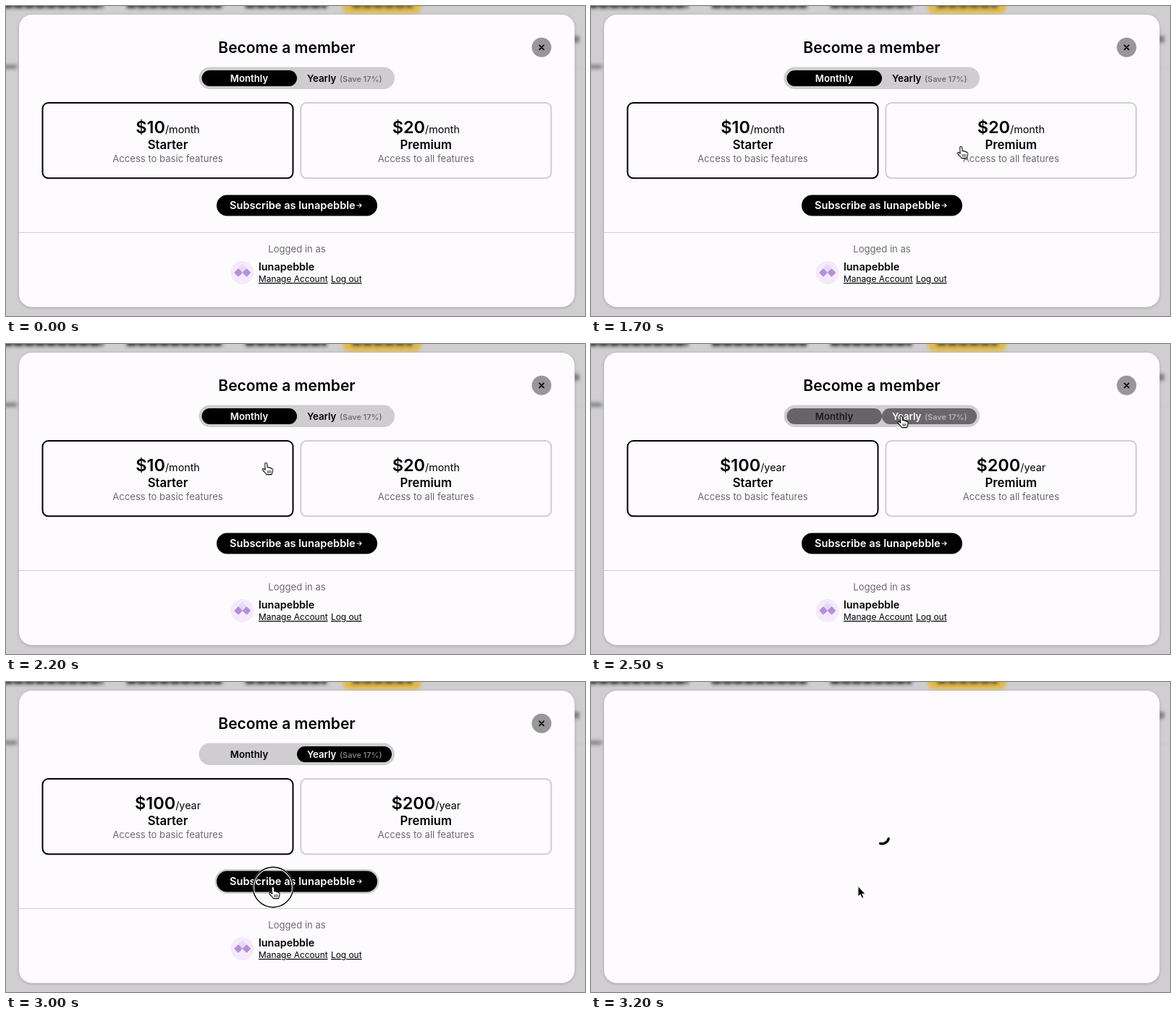
These frames come from a looping animation (800x429 px, 3300 ms). An HTML page:

```html
<!DOCTYPE html>
<html lang="en">
<head>
<meta charset="utf-8">
<title>Become a member</title>
<style>
  html, body { margin: 0; width: 100%; height: 100%; overflow: hidden; background: #d0ced1; }
  svg { display: block; width: 800px; height: 429px; font-family: Inter, sans-serif; }
  .bold { font-weight: 600; }
  .mid { text-anchor: middle; }
  .soft { fill: #6b696c; }
  .price { font-size: 23.5px; font-weight: 600; }
  .price tspan { font-size: 14.3px; font-weight: 400; }
  .plan { font-size: 16.7px; font-weight: 600; }
  .small { font-size: 13.1px; }
  .link { font-size: 11.9px; text-decoration: underline; text-underline-offset: 2px; }
  .card { fill: none; stroke-width: 2; }

  /* One 3.3 s loop, held in steps of 100 ms */
  .anim { animation: 3300ms step-end infinite; }
  #starter { stroke: #000; animation-name: starter; }
  #premium { stroke: #cfcdd0; animation-name: premium; }
  #monthPill { animation-name: monthPill; }
  #yearPill { animation-name: yearPill; }
  #monthText { animation-name: monthText; }
  #yearText { animation-name: yearText; }
  #saving { animation-name: saving; }
  .perMonth { animation-name: untilYearly; }
  .perYear { animation-name: fromYearly; }
  #focus { animation-name: focus; }
  #content { animation-name: content; }
  #loading { animation-name: loading; }
  #spinner { animation-name: spin; }
  #pointer { animation-name: move; }
  #hand { animation-name: hand; }
  #arrow { animation-name: loading; }
  #ring { animation-name: click; }

  @keyframes starter {
    0%, 66.66%, 100% { stroke: #000; }
    57.57% { stroke: #cfcdd0; }
  }
  @keyframes premium {
    0%, 66.66%, 100% { stroke: #cfcdd0; }
    57.57% { stroke: #000; }
  }
  @keyframes monthPill {
    0% { fill: #000; }
    75.75% { fill: #666467; }
    78.78%, 100% { fill: #cfcdd0; }
  }
  @keyframes yearPill {
    0% { fill: #cfcdd0; }
    75.75% { fill: #69676a; }
    78.78%, 100% { fill: #000; }
  }
  @keyframes monthText {
    0% { fill: #fff; }
    75.75% { fill: #1d1c1e; }
    78.78%, 100% { fill: #000; }
  }
  @keyframes yearText {
    0% { fill: #000; }
    75.75%, 100% { fill: #fff; }
  }
  @keyframes saving {
    0% { fill: #717073; }
    75.75% { fill: #b4b2b5; }
    78.78%, 100% { fill: #807e81; }
  }
  @keyframes untilYearly {
    0% { opacity: 1; }
    75.75%, 100% { opacity: 0; }
  }
  @keyframes fromYearly {
    0% { opacity: 0; }
    75.75%, 100% { opacity: 1; }
  }
  @keyframes focus {
    0% { opacity: 0; }
    87.87%, 100% { opacity: 1; }
  }
  @keyframes content {
    0% { opacity: 1; }
    93.93%, 100% { opacity: 0; }
  }
  @keyframes loading {
    0% { opacity: 0; }
    93.93%, 100% { opacity: 1; }
  }
  @keyframes spin {
    0% { transform: rotate(-90deg); }
    96.96%, 100% { transform: rotate(0deg); }
  }
  @keyframes hand {
    0% { opacity: 0; }
    51.51% { opacity: 1; }
    93.93%, 100% { opacity: 0; }
  }
  @keyframes click {
    0%, 57.57%, 66.66%, 75.75%, 93.93%, 100% { opacity: 0; }
    54.54%, 63.63%, 72.72%, 84.84% { opacity: 1; }
  }
  @keyframes move {
    0%, 51.51% { transform: translate(511.5px, 195px); }
    54.54%, 57.57% { transform: translate(530px, 183px); }
    60.6% { transform: translate(442px, 172px); }
    63.63%, 66.66% { transform: translate(359.5px, 165px); }
    69.69% { transform: translate(402px, 126px); }
    72.72%, 75.75% { transform: translate(429px, 100px); }
    78.78% { transform: translate(422px, 125px); }
    81.81% { transform: translate(388px, 222px); }
    84.84%, 100% { transform: translate(369px, 284px); }
  }
</style>
</head>
<body>
<svg viewBox="0 0 800 429">
  <defs>
    <filter id="blur" x="-10" y="-20" width="820" height="140" filterUnits="userSpaceOnUse">
      <feGaussianBlur stdDeviation="2.4"/>
    </filter>
    <filter id="shadow" x="0" y="0" width="800" height="429" filterUnits="userSpaceOnUse">
      <feDropShadow dx="0" dy="1" stdDeviation="2" flood-opacity=".22"/>
    </filter>
  </defs>

  <rect width="800" height="429" fill="#d0ced1"/>
  <g filter="url(#blur)">
    <path d="M-10 85H810" stroke="#c3c1c4"/>
    <rect x="465" y="-18" width="109" height="28" rx="9" fill="#e2b94a"/>
    <path d="M-4 -2H134M167 -2H298M331 -2H443M478 -2H562" stroke="#222124" stroke-width="9" stroke-dasharray="13 2"/>
    <path d="M-4 84H15" stroke="#777578" stroke-width="5"/>
    <path d="M784 46H792" stroke="#777578" stroke-width="9"/>
  </g>
  <rect x="18" y="12" width="767.5" height="404.5" rx="18" fill="#fdfbfe" filter="url(#shadow)"/>

  <g id="content" class="anim">
    <text class="mid bold" x="388" y="65" font-size="21">Become a member</text>
    <circle cx="740" cy="57.3" r="13.5" fill="#989699"/>
    <path d="M737 54.3l6 6m0-6l-6 6" stroke="#000" stroke-width="1.8" stroke-linecap="round"/>

    <rect x="266.5" y="84.5" width="270.5" height="30.5" rx="15.25" fill="#cfcdd0"/>
    <rect id="monthPill" class="anim" x="270.5" y="89" width="131.5" height="22" rx="11"/>
    <rect id="yearPill" class="anim" x="402" y="89" width="131" height="22" rx="11"/>
    <g class="bold">
      <text id="monthText" class="anim mid" x="336" y="105" font-size="13.2">Monthly</text>
      <text id="yearText" class="anim" x="416" y="105" font-size="13.2">Yearly</text>
      <text id="saving" class="anim" x="461" y="104.5" font-size="10.9">(Save 17%)</text>
    </g>

    <rect id="starter" class="anim card" x="50.5" y="134" width="346" height="104.3" rx="8"/>
    <rect id="premium" class="anim card" x="407.3" y="134" width="346" height="104.3" rx="8"/>
    <g class="mid">
      <g class="price">
        <text class="anim perMonth" x="223.5" y="176">$10<tspan>/month</tspan></text>
        <text class="anim perMonth" x="580.3" y="176">$20<tspan>/month</tspan></text>
        <text class="anim perYear" x="223.5" y="176">$100<tspan>/year</tspan></text>
        <text class="anim perYear" x="580.3" y="176">$200<tspan>/year</tspan></text>
      </g>
      <text class="plan" x="223.5" y="198">Starter</text>
      <text class="plan" x="580.3" y="198">Premium</text>
      <text class="small soft" x="223.5" y="215.7">Access to basic features</text>
      <text class="small soft" x="580.3" y="215.7">Access to all features</text>
    </g>

    <rect id="focus" class="anim" x="288.5" y="259" width="227" height="34" rx="17" fill="#cfcdd0"/>
    <rect x="291" y="261.5" width="222" height="29" rx="14.5"/>
    <text class="bold" x="309" y="281" font-size="14.6" fill="#fff">Subscribe as lunapebble</text>
    <path d="M484.5 276H491m-2.6-2.6l2.6 2.6l-2.6 2.6" fill="none" stroke="#fff" stroke-width="1.2"/>

    <path d="M18 313.5H785.5" stroke="#cfcdd0"/>
    <text class="mid small soft" x="402" y="340.7">Logged in as</text>
    <circle cx="326.5" cy="369" r="16" fill="#f4eafb"/>
    <g stroke-linejoin="round" stroke-width="2">
      <path d="M326.5 358.5l4.8 4.8l-4.8 4.8l-4.8-4.8z" fill="#ead8f7" stroke="#ead8f7"/>
      <path d="M321 364.5l4.5 4.5l-4.5 4.5l-4.5-4.5zM332.5 364.5l4.5 4.5l-4.5 4.5l-4.5-4.5z" fill="#b590d8" stroke="#b590d8"/>
    </g>
    <text class="bold" x="349" y="366" font-size="14.4">lunapebble</text>
    <text class="link" x="349" y="382">Manage Account</text>
    <text class="link" x="449" y="382">Log out</text>
  </g>

  <g id="loading" class="anim">
    <g transform="translate(402 214.3)">
      <path id="spinner" class="anim" d="M9.2 2.5A9.5 9.5 0 0 1 -2.5 9.2" fill="none" stroke="#000" stroke-width="3.4" stroke-linecap="round"/>
    </g>
  </g>

  <g id="pointer" class="anim">
    <g id="ring" class="anim" fill="none">
      <circle r="27.2" stroke="#fff" stroke-width="2.6"/>
      <circle r="27.7" stroke="#000" stroke-width="1.4"/>
    </g>
    <g id="hand" class="anim" stroke="#000" stroke-linecap="round" stroke-linejoin="round">
      <path d="M-2 1.2C-2 -1 1.2 -1 1.3 1L1.8 6Q3.8 4.8 4.4 6.4Q6.2 5.6 6.8 7.2Q9 6.8 9 9.5C9 12.5 8 13.5 7.6 15.6L.4 15.6C-.5 13.5 -3 12 -4.8 9.4C-5.8 7.8 -4 6.7 -2.6 8.1L-1.2 9.2Z" fill="#fff" stroke-width="1.1"/>
      <path d="M1.9 10.5l.2 3M3.9 10.4l.1 3M5.9 10.4v3" stroke-width=".8"/>
    </g>
    <path id="arrow" class="anim" d="M0 -1.5V13l3.2-3l2.2 5.2l2.4-1l-2.2-5H10Z" transform="translate(0 0)" fill="#000" stroke="#fff" stroke-width=".9" stroke-linejoin="round"/>
  </g>
</svg>
</body>
</html>
```
